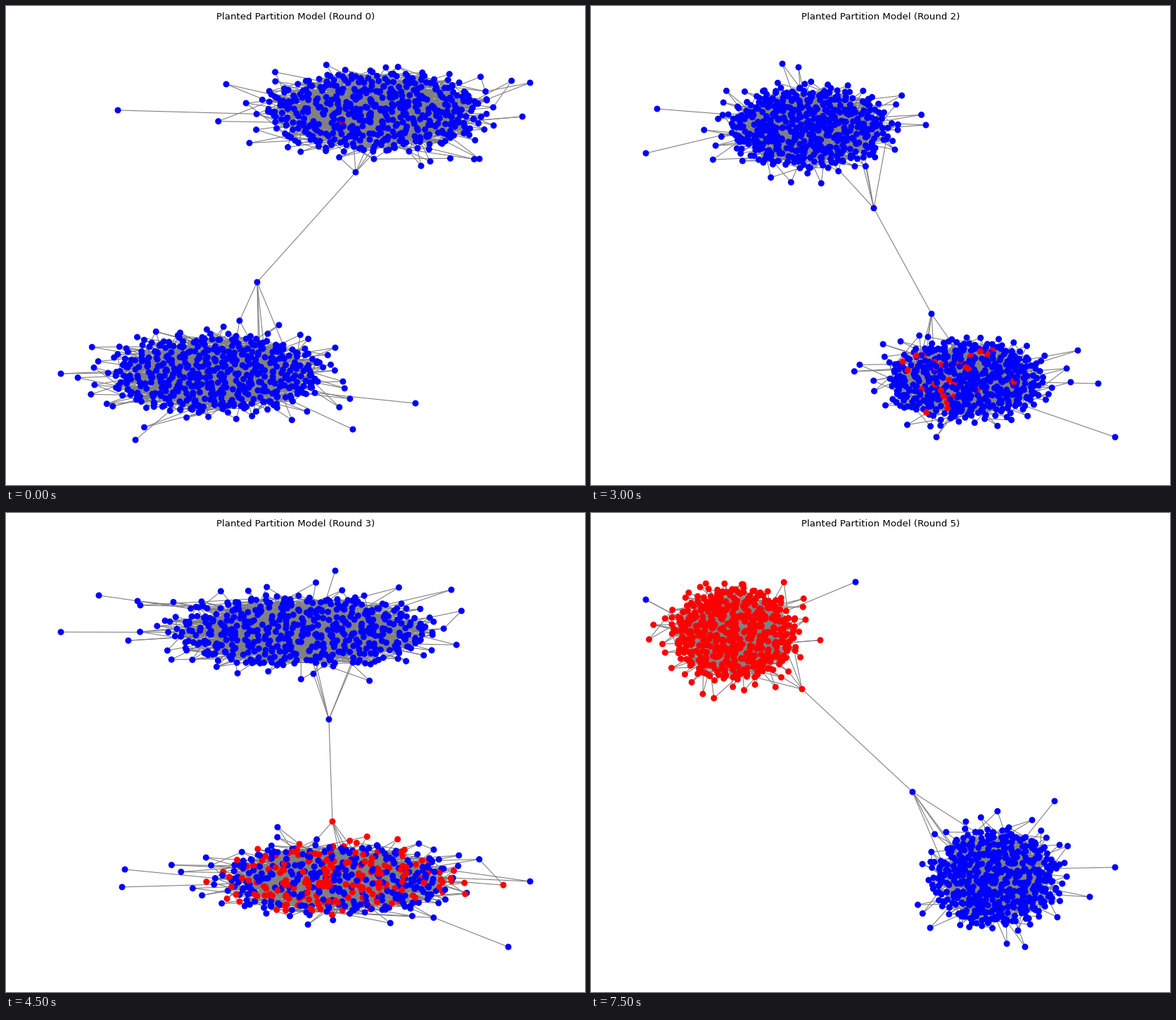
A matplotlib script that plays this animation: 823 by 680 pixels, repeating every 8 s.

```python
import numpy as np
import matplotlib.pyplot as plt
from matplotlib.animation import FuncAnimation
from matplotlib.collections import LineCollection

W, H, DPI = 823, 680, 64
UNIT = 80 / DPI               # drawing units are points at 80 dpi
LOW, HIGH = (77, 81), (746, 617)   # area the nodes may fill
CORE, HALO = 462, 34          # nodes per community
COLORS = np.array(["blue", "red"])
GOLDEN = np.pi * (3 - 5 ** 0.5)
SHARE = [0.002, 0.018, 0.07, 0.4, 0.88, 1]   # infected part, by round


def spread(rng):
    """Evenly filled, slightly squarish unit disc with a sparse halo."""
    i = np.arange(CORE + HALO)
    r = np.minimum((i + 0.5) / CORE, 1) ** 0.53
    r[CORE:] = np.minimum(1.07 + rng.exponential(0.14, HALO), 1.42)
    a = GOLDEN * i
    c, s = np.cos(a), np.sin(a)
    r /= (abs(c) ** 2.3 + abs(s) ** 2.3) ** (1 / 2.3)
    q = np.column_stack([r * c, r * s])
    return rng.permutation(q + rng.normal(0, 0.045, q.shape))


def random_edges(rng, q):
    """Join each node to some that lie a little further inwards."""
    r = np.hypot(*q.T)
    src = np.repeat(np.arange(len(q)), np.select([r < 0.75, r < 1.05], [5, 3], 2))
    cand = rng.integers(0, len(q), (len(src), 9))
    d = np.linalg.norm(q[cand] - 0.6 * q[src][:, None], axis=2)
    d[r[src] < 0.8, 3:] = np.inf      # looser choice in the middle
    return src, cand[np.arange(len(src)), d.argmin(1)]


def nearest(nodes, point):
    return nodes[np.linalg.norm(nodes - point, axis=1).argsort()]


def community(center, radii, hub, tips, share=0):
    """Nodes, infected flags, edges and hub of one community."""
    rng = np.random.default_rng(center[0])
    mid, rad, hub, tips = (np.array(v, float) for v in (center, radii, hub, tips))
    body = spread(rng) * rad + mid
    body = body[((body > LOW) & (body < HIGH)).all(axis=1)]
    q = (body - mid) / rad
    src, dst = random_edges(rng, q)
    segs = [np.stack([body[src], body[dst]], axis=1)]

    # outlying nodes hang on the rim by one or two edges
    for tip in tips:
        reach = np.hypot(*((tip - mid) / rad))
        ends = nearest(body, mid + (tip - mid) * 1.05 / reach)
        segs.append([(tip, e) for e in ends[:1 if reach > 1.7 else 8:4]])

    nodes = np.vstack([body, tips, hub])
    fan = nearest(nodes[:-1], hub)[:60:12]
    segs.append([(hub, e) for e in fan])

    red = np.zeros(len(nodes), bool)
    weight = np.clip(1.45 - np.hypot(*q.T), 0.12, 1)
    count = round(share * len(body))
    red[rng.choice(len(body), count, replace=False, p=weight / weight.sum())] = True
    red[-1] = share > 0.3
    return nodes, red, np.concatenate(segs), hub


def graph(sick, healthy):
    bridge = np.stack([sick[3], healthy[3]])[None]
    return (np.concatenate([sick[0], healthy[0]]),
            COLORS[np.concatenate([sick[1], healthy[1]]).astype(int)],
            np.concatenate([sick[2], healthy[2], bridge]))


rounds = [
    graph(
        community((525, 150), (155, 56), (497, 236),
                  [(159, 148), (745, 109), (313, 111), (590, 227), (673, 217)],
                  SHARE[0]),
        community((300, 522), (150, 55), (357, 392),
                  [(582, 564), (493, 601), (184, 616), (78, 522), (388, 453)])),
    graph(
        community((288, 523), (95, 56), (382, 452),
                  [(78, 552), (226, 616), (166, 471), (209, 450), (432, 516)],
                  SHARE[1]),
        community((629, 190), (94, 58), (519, 303),
                  [(534, 88), (668, 82), (679, 93), (479, 216), (714, 111)])),
    graph(
        community((532, 531), (108, 54), (484, 437),
                  [(721, 536), (745, 612), (692, 489), (491, 612)],
                  SHARE[2]),
        community((309, 172), (112, 56), (402, 287),
                  [(94, 146), (78, 209), (272, 82), (295, 87), (476, 169)])),
    graph(
        community((470, 520), (165, 49), (464, 438),
                  [(169, 506), (165, 531), (714, 616), (745, 523), (386, 446)],
                  SHARE[3]),
        community((420, 168), (182, 50), (459, 293),
                  [(132, 117), (78, 169), (468, 82), (633, 109), (187, 125)])),
    graph(
        community((628, 511), (82, 67), (544, 422),
                  [(745, 472), (464, 575), (658, 616), (680, 417)],
                  SHARE[4]),
        community((232, 187), (83, 69), (379, 292),
                  [(316, 82), (78, 169), (111, 176), (187, 287)])),
    graph(
        community((204, 172), (87, 65), (300, 250),
                  [(78, 123), (376, 98)],
                  SHARE[5]),
        community((575, 517), (87, 67), (457, 396),
                  [(659, 409), (745, 503), (617, 616), (709, 545)])),
]

fig = plt.figure(figsize=(W / DPI, H / DPI), dpi=DPI, facecolor="white")
ax = fig.add_axes([0, 0, 1, 1])
ax.set_xlim(0, W)
ax.set_ylim(H, 0)
ax.axis("off")

edges = LineCollection([], colors="gray", linewidths=UNIT, zorder=1)
ax.add_collection(edges)
dots = ax.scatter([], [], s=50 * UNIT ** 2, linewidths=UNIT, zorder=2)
title = ax.text(412, 19, "", ha="center", va="baseline",
                family="DejaVu Sans", fontsize=12 * UNIT)


def draw(frame):
    n = frame // 3            # each round lasts three steps
    nodes, colors, segs = rounds[n]
    edges.set_segments(segs)
    dots.set_offsets(nodes)
    dots.set_color(colors)
    title.set_text(f"Planted Partition Model (Round {n})")
    return edges, dots, title


anim = FuncAnimation(fig, draw, frames=16, interval=500, repeat=True,
                     repeat_delay=0, init_func=lambda: draw(0))
plt.show()
```
